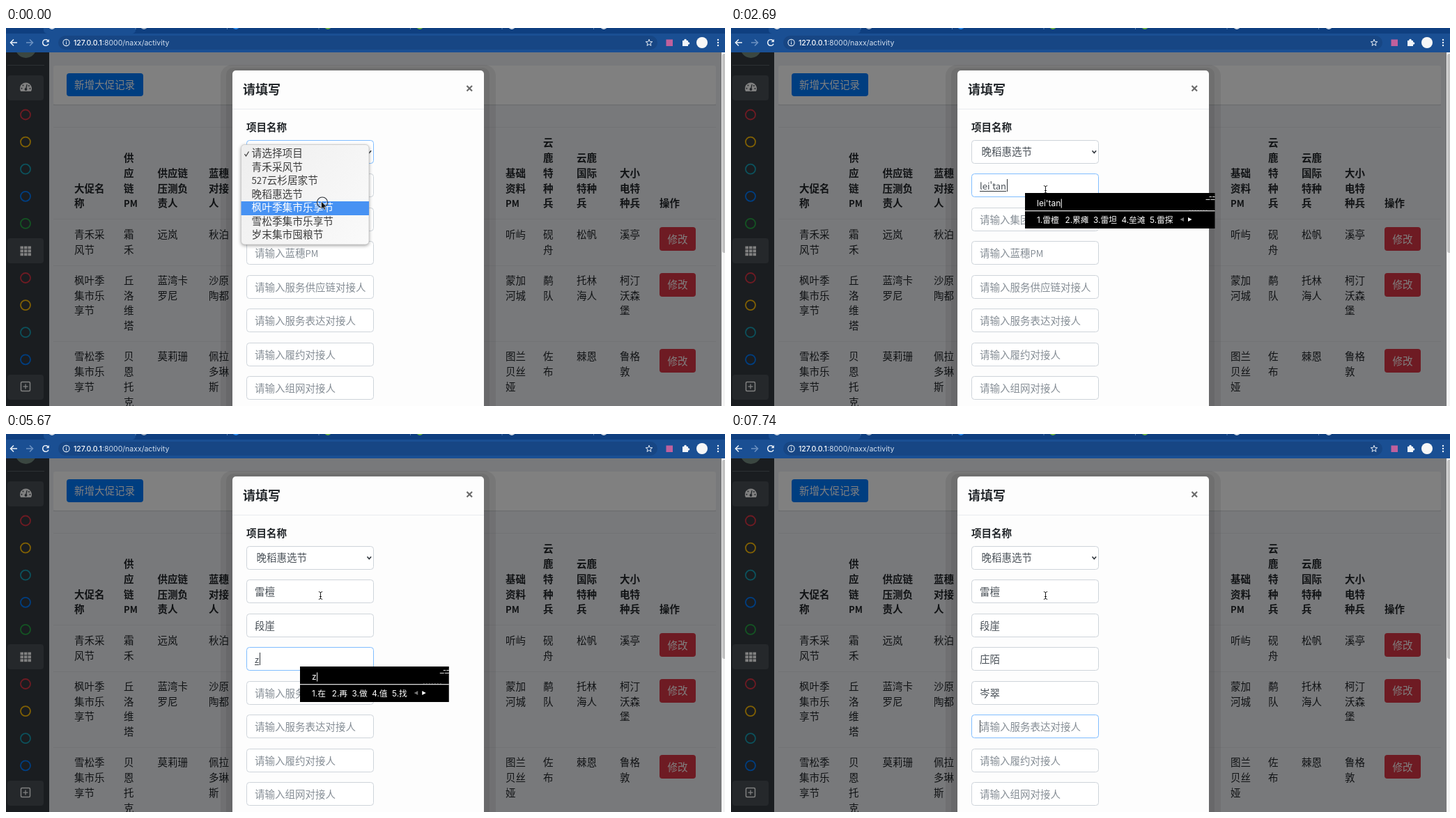
An HTML page with a canvas for the animation above (8 s loop, 1032 by 543 pixels).

```html
<!DOCTYPE html>
<html lang="zh-CN">
<head>
<meta charset="utf-8">
<title>Form</title>
<style>
html, body { margin: 0; width: 100%; height: 100%; overflow: hidden; background: #7b7c7e; }
canvas { display: block; width: 1032px; height: 543px; }
</style>
</head>
<body>
<canvas id="stage"></canvas>
<script>
const W = 1032, H = 543, LOOP = 8000;
const canvas = document.getElementById('stage');
const dpr = window.devicePixelRatio || 1;
canvas.width = W * dpr;
canvas.height = H * dpr;
const g = canvas.getContext('2d');
const CJK = '"Noto Sans CJK SC", "Noto Sans CJK", "Noto Sans", sans-serif';
const UI = 'Inter, "Noto Sans CJK SC", "Noto Sans CJK", sans-serif';

// Colours of the page as seen through the half-transparent backdrop.
const DIM = { red: '#6e1b23', yellow: '#806004', teal: '#0c515c', blue: '#003e80', green: '#145423', white: '#808080' };

function box(x, y, w, h, r, fill, stroke, lw = 1) {
  g.beginPath();
  g.roundRect(x, y, w, h, r);
  if (fill) { g.fillStyle = fill; g.fill(); }
  if (stroke) { g.strokeStyle = stroke; g.lineWidth = lw; g.stroke(); }
}
function rect(x, y, w, h, fill) { g.fillStyle = fill; g.fillRect(x, y, w, h); }
function disc(x, y, r, fill) { g.beginPath(); g.arc(x, y, r, 0, 7); g.fillStyle = fill; g.fill(); }
function ring(x, y, r, color, lw) {
  g.beginPath(); g.arc(x, y, r, 0, 7);
  g.strokeStyle = color; g.lineWidth = lw; g.stroke();
}
function path(points, fill, stroke, lw = 1) {
  g.beginPath();
  for (let i = 0; i < points.length; i += 2) g.lineTo(points[i], points[i + 1]);
  if (fill) { g.closePath(); g.fillStyle = fill; g.fill(); }
  if (stroke) { g.strokeStyle = stroke; g.lineWidth = lw; g.stroke(); }
}
// Latin runs are set smaller than the Chinese ones; returns the end x.
function text(str, x, cy, color, size = 14.5, weight = 400) {
  g.fillStyle = color;
  for (const run of str.match(/[\x00-\x7f]+|[^\x00-\x7f]+/g) || []) {
    g.font = `${weight} ${run.charCodeAt(0) < 128 ? size * 0.9 : size}px ${CJK}`;
    g.fillText(run, x, cy + size * 0.37);
    x += g.measureText(run).width;
  }
  return x;
}
function uiText(str, x, base, size, color, weight = 400) {
  g.font = `${weight} ${size}px ${UI}`;
  g.fillStyle = color;
  g.fillText(str, x, base);
  return x + g.measureText(str).width;
}

// ---- table -------------------------------------------------------------
const LINE = 21.75;
const COLS = [98, 169, 217.5, 291, 717, 771, 819, 881, 938];
const HEAD = ['大促名/称', '供/应/链/PM', '供应链/压测负/责人', '蓝穗/对接/人', '基础/资料/PM',
  '云/鹿/特/种/兵', '云鹿/国际/特种/兵', '大小/电特/种兵', '操作'];
const ROWS = [
  [297, '青禾采/风节', '霜/禾', '远岚', '秋泊', '听屿', '砚/舟', '松帆', '溪亭'],
  [362.5, '枫叶季/集市乐/享节', '丘/洛/维/塔', '蓝湾卡/罗尼', '沙原/陶都', '蒙加/河城', '鹬/队', '托林/海人', '柯汀/沃森/堡'],
  [472, '雪松季/集市乐/享节', '贝/恩/托/克', '莫莉珊', '佩拉/多琳/斯', '图兰/贝丝/娅', '佐/布', '棘恩', '鲁格/敦']
];

function drawTable() {
  for (const y of [142, 274, 341, 450]) rect(68, y, 951, 1, 'rgba(0,0,0,.05)');
  HEAD.forEach((cell, c) => {
    const lines = cell.split('/');
    lines.forEach((s, i) => text(s, COLS[c], 252 - (lines.length - 1 - i) * LINE, '#111315', 14.5, 700));
  });
  for (const [y, ...cells] of ROWS) {
    cells.forEach((cell, c) => cell.split('/').forEach((s, i) => text(s, COLS[c], y + i * LINE, '#111315')));
    box(938, Math.round(y - 11), 52, 34, 4, DIM.red);
    text('修改', 949.5, y + 6.5, DIM.white);
  }
}

// ---- browser and side bar ---------------------------------------------
function drawBrowser() {
  rect(0, 0, W, 35, '#1a4f93');
  rect(0, 0, W, 8, '#0f3f80');
  box(54, -10, 132, 18, [0, 0, 5, 5], '#1a4f93');
  ['#d5dde8', '#a9b7c9', '#2a8cf0', '#6cb33f', '#6cb33f', '#d5dde8', '#d5dde8'].forEach((c, i) => {
    disc(66 + i * 132, -3, 5, c);
    if (i) rect(54 + i * 131.5, 0, 1, 2, '#5b82b5');
  });
  box(75, 11, 860, 20, 10, '#174684');
  for (const [x, dir, c] of [[11, 1, '#eef3f9'], [34, -1, '#6e93c2']]) {
    path([x + 5 * dir, 21, x - 4 * dir, 21], null, c, 1.5);
    path([x, 16.5, x - 4.5 * dir, 21, x, 25.5], null, c, 1.5);
  }
  g.beginPath(); g.arc(57, 21, 4.3, 0.4, 5.5);
  g.strokeStyle = '#eef3f9'; g.lineWidth = 1.5; g.stroke();
  path([61.8, 16, 61.8, 20.3, 57.5, 20.3], '#eef3f9');
  ring(86.5, 21, 4.6, '#dfe8f2', 1.1);
  rect(86, 20.3, 1.1, 3.2, '#dfe8f2');
  rect(86, 18.3, 1.1, 1.1, '#dfe8f2');
  const end = uiText('127.0.0.1', 97, 24.8, 10.5, '#ffffff', 500);
  uiText(':8000/naxx/activity', end, 24.8, 10.5, '#d3dfee');

  const star = [];
  for (let i = 0; i <= 10; i++) {
    const r = i % 2 ? 2.1 : 5, a = i * Math.PI / 5 - Math.PI / 2;
    star.push(923 + r * Math.cos(a), 21.3 + r * Math.sin(a));
  }
  path(star, null, '#e4ebf4', 1);
  box(947.5, 16.5, 9.5, 9.5, 0, '#c0609c');
  rect(971, 18, 8, 8, '#f2f5f9');
  disc(975, 17.5, 1.8, '#f2f5f9');
  disc(979.5, 22, 1.8, '#f2f5f9');
  disc(999, 21, 8, '#f7f7f7');
  for (const y of [17, 21, 25]) disc(1022, y, 1.2, '#eef3f9');
}

function drawSidebar() {
  rect(0, 35, 62, H - 35, '#1a1d20');
  g.save();
  g.beginPath(); g.rect(0, 35, 62, 20); g.clip();
  disc(28.5, 28, 15, '#3b4741');
  g.restore();
  const dark = '#25282b', pale = DIM.white;
  rect(2, 53, 53, 1, '#2c3033');
  for (const y of [68, 302, 498]) box(2, y, 52, 36, 4, dark);
  [DIM.red, DIM.yellow, DIM.teal, DIM.blue, DIM.green].forEach((c, i) => {
    ring(28, 124.5 + i * 39.1, 7, c, 1.8);
    if (i < 4) ring(28, 359 + i * 39.1, 7, c, 1.8);
  });
  g.beginPath(); g.arc(28.5, 87, 8.5, Math.PI - 0.5, 0.5); g.closePath();
  g.fillStyle = pale; g.fill();
  for (const a of [-3.1, -2.3, -0.75, 0]) disc(28.5 + 6 * Math.cos(a), 87 + 6 * Math.sin(a), 1, dark);
  path([28.5, 88, 30.2, 81], null, dark, 1.3);
  disc(28.5, 88, 1.9, dark);
  for (let i = 0; i < 9; i++) rect(20.5 + i % 3 * 5.5, 313.5 + (i / 3 | 0) * 4.9, 4.5, 3.9, pale);
  box(21.5, 508.5, 13, 13, 1.5, null, pale, 1.5);
  rect(24.5, 514.4, 7, 1.3, pale);
  rect(27.4, 511.5, 1.3, 7, pale);
}

function drawPage() {
  rect(62, 35, W - 62, H - 35, '#78797b');
  box(68, 54, 951, 56, 3, '#808080');
  rect(68, 110, 951, 1, '#686a6c');
  box(87, 65, 110, 33, 4, DIM.blue);
  text('新增大促记录', 98, 82, DIM.white);
  drawTable();
  box(308, 53, 395, H, 16, 'rgba(0,0,0,.07)');
  box(316, 57, 378, H, 10, 'rgba(0,0,0,.07)');
  rect(1027, 35, 5, H - 35, '#f4f4f4');
  box(1028, 37, 6, 286, 3, '#c1c1c1');
}

// ---- form --------------------------------------------------------------
const HINTS = ['供应链PM', '集团压测负责人', '蓝穗PM', '服务供应链对接人', '服务表达对接人', '履约对接人', '组网对接人'];
const OPTIONS = ['请选择项目', '青禾采风节', '527云杉居家节', '晚稻惠选节', '枫叶季集市乐享节', '雪松季集市乐享节', '岁末集市囤粮节'];
const fieldY = i => Math.floor(209.5 + i * 48.5);

// [time, field, letters typed, candidates]; no candidates means committed text
const STEPS = [
  [1200, 0, ''],
  [2100, 0, 'l', '了 来 里 老 两'],
  [2250, 0, 'le', '了 乐 勒 肋 叻'],
  [2400, 0, 'lei', '类 累 雷 泪 勒'],
  [2540, 0, "lei'ta", '雷塔 类塔 累塌 雷踏 垒塔'],
  [2690, 0, "lei'tan", '雷檀 累瘫 雷坦 垒滩 雷探'],
  [2990, 0, '雷檀'],
  [3140, 1, ''],
  [3290, 1, 'd', '的 都 到 大 对'],
  [3440, 1, 'du', '读 度 独 都 毒'],
  [3580, 1, 'duan', '段 短 断 端 缎'],
  [4630, 1, "duan'ya", '断崖 段崖 端雅 短鸭 断压'],
  [5220, 1, '段崖'],
  [5520, 2, ''],
  [5670, 2, 'z', '在 再 做 值 找'],
  [5820, 2, 'zh', '这 中 只 着 找'],
  [5970, 2, 'zhu', '住 主 祝 注 猪'],
  [6110, 2, 'zhuang', '装 庄 撞 状 壮'],
  [6260, 2, "zhuang'mo", '庄陌 装模 桩墨 庄沫 装没'],
  [6550, 2, '庄陌'],
  [6700, 3, ''],
  [6850, 3, 'c', '从 次 出 查 才'],
  [7000, 3, 'ce', '测 策 侧 册 厕'],
  [7150, 3, "cen'c", '参差不齐 参差错 参差 岑错 涔涔'],
  [7290, 3, "cen'cui", '岑翠 参脆 岑崔 岑粹 参催'],
  [7590, 3, '岑翠'],
  [7740, 4, '']
];

function stateAt(t) {
  const values = [];
  let now = null;
  for (const s of STEPS) {
    if (s[0] > t) break;
    now = s;
    values[s[1]] = s[2];
  }
  return { values, focus: now ? now[1] : -1, list: now && now[3] };
}

function drawField(y, focused) {
  box(345.5, y + 0.5, 182, 33, 4, '#fff', focused ? '#80bdff' : '#ced4da');
}

function drawModal(t, state) {
  box(325, 61, 361, H, 5, '#fdfdfd');
  text('请填写', 340, 88.5, '#212529', 18, 700);
  path([661.5, 83, 669, 90.5], null, '#6b6b6b', 2.2);
  path([669, 83, 661.5, 90.5], null, '#6b6b6b', 2.2);
  rect(325, 116, 361, 1, '#e9ecef');
  text('项目名称', 345, 142.5, '#212529', 14.5, 700);

  drawField(161, t < 1200);
  if (t >= 1050) text('晚稻惠选节', 359.5, 178, '#495057');
  path([518.5, 176.3, 521.3, 179.5, 524.1, 176.3], null, '#343a40', 1.7);

  HINTS.forEach((hint, i) => {
    const y = fieldY(i), cy = y + 17.3, focused = i === state.focus;
    const value = state.values[i] || '';
    drawField(y, focused);
    if (!value) text('请输入' + hint, 357, cy, '#868e96');
    const end = value ? text(value, 357, cy, '#495057') : 357;
    if (!focused) return;
    if (state.list) rect(357, y + 25, end - 357, 1, '#33383d');
    const hidden = t >= 1650 && t < 2100 || t >= 4030 && t < 4630;
    if (!hidden) rect(Math.round(end) + (value ? 1 : 0), y + 8, 1, 18, '#33383d');
  });
}

function drawCandidates(state) {
  if (!state.list) return;
  const words = state.list.split(' ');
  const y = fieldY(state.focus) + 28;
  const end = words.reduce((x, w) => x + 17 + 11.75 * w.length, 439);
  const right = end + 53;
  rect(422, y, right - 422, 51, '#000');
  rect(422, y + 25, right - 422, 1.3, '#d8d8d8');
  const caret = uiText(state.values[state.focus], 439, y + 19, 12, '#fff');
  rect(caret + 0.5, y + 8.5, 1, 13, '#fff');
  let x = 439;
  words.forEach((w, i) => {
    uiText(`${i + 1}.${w}`, x, y + 42.5, 11.75, '#fff');
    x += 17 + 11.75 * w.length;
  });
  path([end + 3, y + 38, end + 8.5, y + 35, end + 8.5, y + 41], '#777');
  path([end + 20, y + 38, end + 14.5, y + 35, end + 14.5, y + 41], '#fff');
  for (let i = 0; i < 2; i++) {
    rect(right - 8 + i * 4.5, y + 5, 3.5, 1, '#ddd');
    rect(right - 13 + i * 7, y + 9, 6, 1, '#ddd');
  }
  for (let i = 0; i < 7; i++) rect(right - 37 + i * 4, y + 24, 2, 1, '#444');
}

function drawMenu(t) {
  if (t >= 1050) return;
  const shade = g.createLinearGradient(337, 167, 521, 311);
  shade.addColorStop(0, '#eeeeee');
  shade.addColorStop(1, '#fafafa');
  g.save();
  g.shadowColor = 'rgba(0,0,0,.4)';
  g.shadowBlur = 5 * dpr;
  g.shadowOffsetY = 1.5 * dpr;
  box(337.5, 167.5, 183.5, 143.5, 5, shade);
  g.restore();
  box(337.5, 167.5, 183.5, 143.5, 5, null, '#c4c4c4', 0.7);
  const active = t < 150 ? 4 : t >= 900 ? -1 : 3;
  OPTIONS.forEach((name, i) => {
    const cy = 180 + i * 19.5;
    if (i === active) rect(337.5, Math.round(cy - 9), 183.5, 20, '#4792f3');
    text(name, 352.5, cy, i === active ? '#fff' : '#3d3d3d', 14.7);
  });
  path([342.5, 181, 344.5, 184, 348.5, 177.5], null, '#333', 1.2);
}

function drawPointer(t) {
  if (t < 2100) {
    const step = Math.min(5, Math.floor(t / 150));
    const k = step / 5;
    const x = 452.5 - 1.5 * k, y = 249 - 18 * k * (2 - k);
    if (t < 150) ring(454, 250.5, 7.5, '#30343a', 1.2);
    path([x, y, x, y + 11, x + 2.5, y + 8.7, x + 4.2, y + 12.3, x + 6, y + 11.4, x + 4.4, y + 8, x + 7.6, y + 7.8],
      '#111', '#fff', 0.6);
    return;
  }
  rect(451, 227, 1, 10, '#222');
  for (const y of [226.5, 237.5]) {
    const d = y < 230 ? 1 : -1;
    path([448.8, y, 451.5, y + d, 454.2, y], null, '#222', 1);
  }
  rect(450, 233, 3, 1, '#222');
}

function draw(ms) {
  const t = ms % LOOP;
  const state = stateAt(t);
  g.setTransform(dpr, 0, 0, dpr, 0, 0);
  drawPage();
  drawSidebar();
  drawBrowser();
  drawModal(t, state);
  drawMenu(t);
  drawPointer(t);
  drawCandidates(state);
}

const start = performance.now();
function tick() {
  draw(performance.now() - start);
  requestAnimationFrame(tick);
}
tick();
</script>
</body>
</html>
```
